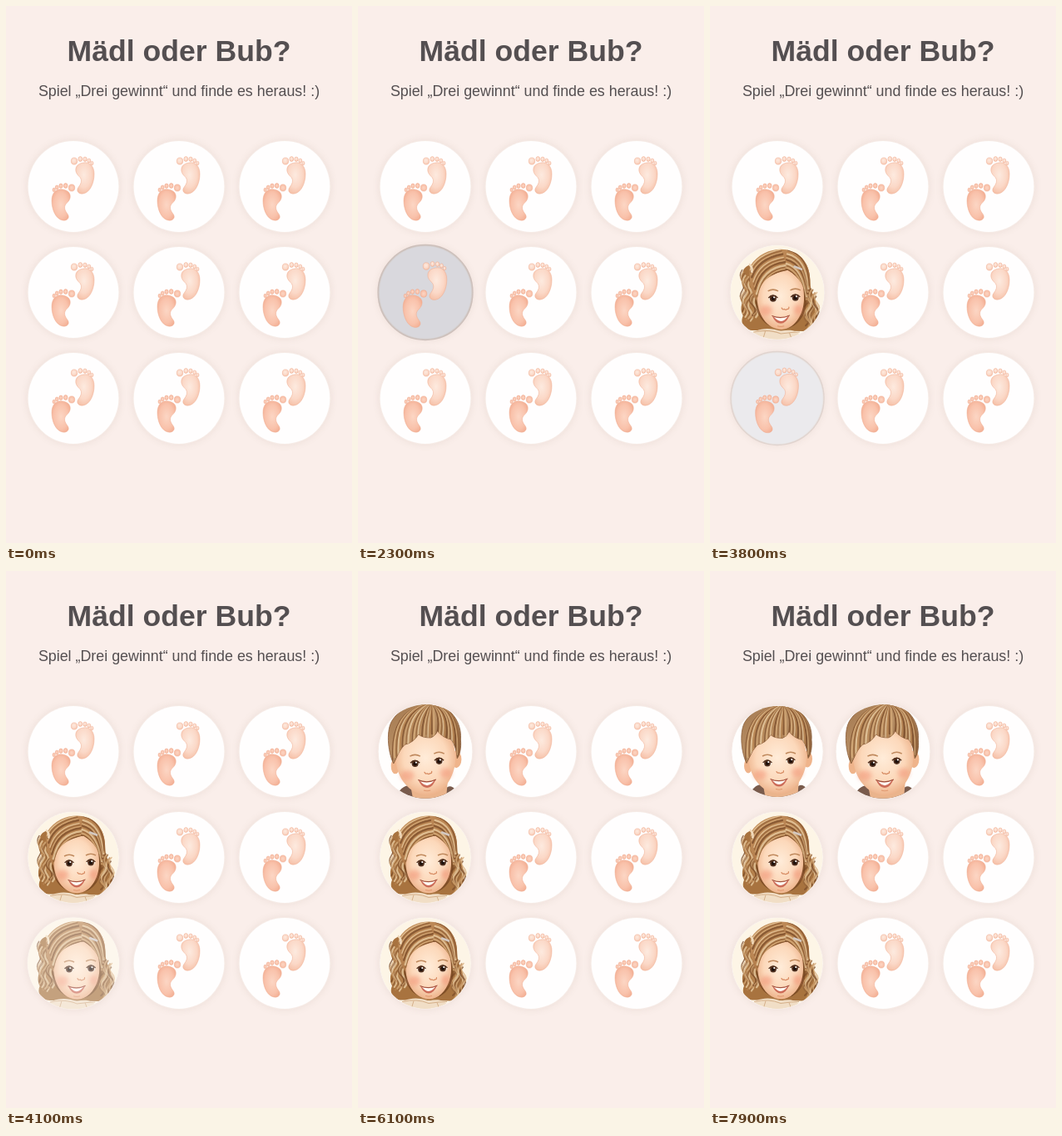
Animation, 416 px wide and 644 px high, one loop 8000 ms. Source, as an HTML page:

```html
<!DOCTYPE html>
<html lang="de">
<head>
<meta charset="utf-8">
<title>Mädl oder Bub?</title>
<style>
  html, body { margin: 0; width: 100%; height: 100%; overflow: hidden; background: #faeeea; }
  svg { display: block; width: 416px; height: 644px; }
  text { font-family: "Liberation Sans", Arial, sans-serif; text-anchor: middle; fill: #544f51; }
  .hair path { fill: none; stroke-linecap: round; }
</style>
</head>
<body>
<svg id="stage" viewBox="0 0 416 644">
  <defs>
    <filter id="soft" x="-50%" y="-50%" width="200%" height="200%"><feGaussianBlur stdDeviation="4"/></filter>
    <filter id="blush" x="-50%" y="-50%" width="200%" height="200%"><feGaussianBlur stdDeviation="2.5"/></filter>
    <radialGradient id="pale" cx=".45" cy=".4" r=".65">
      <stop offset="0" stop-color="#fdeadf"/><stop offset=".6" stop-color="#fbd8c7"/><stop offset="1" stop-color="#f5bda3"/>
    </radialGradient>
    <radialGradient id="warm" cx=".5" cy=".5" r=".65">
      <stop offset="0" stop-color="#fcd6c4"/><stop offset=".6" stop-color="#f9c2ab"/><stop offset="1" stop-color="#f0a689"/>
    </radialGradient>
    <radialGradient id="skin" cx=".5" cy=".45" r=".6">
      <stop offset="0" stop-color="#ffecd9"/><stop offset=".6" stop-color="#fcd8ba"/><stop offset="1" stop-color="#e9a97f"/>
    </radialGradient>
    <linearGradient id="gold" x1="0" y1="0" x2="1" y2="1">
      <stop offset="0" stop-color="#cf9f6b"/><stop offset=".5" stop-color="#b27c4b"/><stop offset="1" stop-color="#9a6539"/>
    </linearGradient>
    <linearGradient id="chestnut" x1="0" y1="0" x2="1" y2="1">
      <stop offset="0" stop-color="#a2774e"/><stop offset=".45" stop-color="#b88f65"/><stop offset="1" stop-color="#7d5535"/>
    </linearGradient>
    <path id="locks" d="M-32,-30C-20,-50 4,-53 16,-48C30,-44 38,-30 38,-14C38,-4 36,6 33,10C33,-6 26,-18 12,-26C2,-24 -10,-20 -16,-12C-21,-6 -22,2 -24,10C-30,2 -34,-14 -32,-30Z"/>
    <path id="mop" d="M-37,14C-44,0 -46,-26 -38,-37C-28,-52 -10,-57 4,-55C24,-57 43,-38 41,-14C42,-4 40,4 37,8Q36,-6 30,-14Q20,-16 14,-24Q12,-18 6,-16Q-4,-16 -8,-20Q-14,-10 -24,-8Q-30,-2 -34,8Z"/>
    <clipPath id="disc"><circle r="54.4"/></clipPath>
    <clipPath id="in-locks"><use href="#locks"/></clipPath>
    <clipPath id="in-mop"><use href="#mop"/></clipPath>

    <g id="foot" stroke="#efab8e" stroke-width=".5">
      <path d="M12,-28.5C19,-30 25,-25 25,-15C25,-4 20,7 12,8.5C6,9.5 3,5 6,1C9,-3 11,-7 8,-11C5,-14 2,-17 3,-22C4,-26 8,-28 12,-28.5Z"/>
      <ellipse cx="1" cy="-30.5" rx="3.7" ry="4.1"/>
      <ellipse cx="8.3" cy="-33" rx="2.4" ry="2.9"/>
      <ellipse cx="14" cy="-32.8" rx="2.2" ry="2.7"/>
      <ellipse cx="18.8" cy="-31" rx="2" ry="2.5"/>
      <ellipse cx="22.4" cy="-28" rx="1.6" ry="2.2"/>
    </g>
    <g id="feet">
      <use href="#foot" fill="url(#pale)"/>
      <use href="#foot" fill="url(#warm)" transform="translate(-1,32) scale(-1,1)"/>
    </g>

    <g id="eye">
      <ellipse rx="5" ry="4" fill="#fff6ee"/>
      <circle r="3.9" fill="#55321f"/>
      <circle cy=".3" r="2.2" fill="#1e100b"/>
      <circle cx="1.3" cy="-1.4" r="1.1" fill="#fff"/>
      <path d="M-5.4,-.6Q0,-6.6 5.4,-.6" fill="none" stroke="#4f2d1b" stroke-width="1.4"/>
      <path d="M-6,-8.5Q0,-12 6,-8.5" fill="none" stroke="#c08a5e" stroke-width="1.5"/>
    </g>
    <g id="smile">
      <path d="M-10,-2.5Q0,1.5 10,-3Q6,6 0,6Q-6,6 -10,-2.5Z" fill="#cc6c59"/>
      <path d="M-8,-1.6Q0,1.5 8,-2Q4,3.4 0,3.4Q-4,3.4 -8,-1.6Z" fill="#fffaf4"/>
      <path d="M-10.5,-3Q0,1.5 10.5,-3.5" fill="none" stroke="#9b4a38"/>
      <path d="M-4,9Q0,10.5 4,9" fill="none" stroke="#e0986f"/>
    </g>
    <path id="nose" d="M-4,0Q-3,2.4 -1,1.4Q1,3 3,1.2Q4.6,1.6 4.4,-1" fill="none" stroke="#d78b62" stroke-width="1.2" stroke-linecap="round"/>

    <g id="girl" clip-path="url(#disc)">
      <circle r="55" fill="#fdf5e6"/>
      <path fill="#a8733f" d="M-26,-34C-5,-54 22,-50 34,-32C40,-20 37,-10 40,0C48,10 43,20 47,28C46,38 38,44 30,45L-28,44C-38,44 -44,36 -40,27C-45,18 -40,8 -36,0C-42,-6 -44,-18 -39,-27C-35,-33 -29,-32 -26,-34Z"/>
      <g class="hair" id="curls"/>
      <path fill="#f1dec6" d="M-38,57C-28,40 -10,40 4,45C14,43 24,42 32,57Z"/>
      <path fill="none" stroke="#d5b08a" d="M-28,46Q-10,42 4,48Q18,46 26,46M-14,45L-17,55M14,47L17,55"/>
      <path fill="#73431f" d="M-26,6C-27,-18 -8,-28 10,-29C27,-27 35,-10 34,8C34,28 22,42 7,42C-14,42 -26,28 -26,6Z" opacity=".75"/>
      <path fill="url(#skin)" d="M-24,2C-24,-18 -8,-27 10,-27C24,-26 31,-12 31,4C32,22 22,42 5,43C-12,43 -24,26 -24,2Z"/>
      <g fill="#f3977a" opacity=".6" filter="url(#blush)"><ellipse cx="-13" cy="21" rx="7" ry="6"/><ellipse cx="24" cy="20" rx="5" ry="6"/></g>
      <use href="#eye" x="-5" y="7"/><use href="#eye" x="21" y="6"/>
      <use href="#nose" x="9" y="18"/><use href="#smile" x="4" y="30"/>
      <use href="#locks" fill="url(#gold)"/>
      <g class="hair" id="sweep" clip-path="url(#in-locks)"/>
      <path d="M-33,-33Q-28,-29 -30,-23" fill="none" stroke="#f0d9ba" stroke-width="2.5"/>
      <path d="M20,-30L28,-27" stroke="#d3c8c1" stroke-width="2.5" stroke-linecap="round"/>
    </g>

    <g id="boy" clip-path="url(#disc)">
      <circle r="55" fill="#fffefd"/>
      <path fill="#795b4c" d="M-36,57C-30,40 -20,36 -12,42L22,45C28,36 36,40 40,57Z"/>
      <path fill="#eab48c" d="M-18,36L26,34L24,57L-14,57Z"/>
      <ellipse cx="-35" cy="17" rx="5" ry="9" fill="#efb48b"/><ellipse cx="36" cy="9" rx="6" ry="10" fill="#efb48b"/>
      <path fill="url(#skin)" d="M-35,5C-36,-18 -18,-28 2,-28C24,-28 35,-14 35,6C36,26 22,51 3,51C-18,50 -34,32 -35,5Z"/>
      <g fill="#f3977a" opacity=".55" filter="url(#blush)"><ellipse cx="-21" cy="28" rx="8" ry="6"/><ellipse cx="24" cy="25" rx="7" ry="6"/></g>
      <use href="#eye" x="-12" y="14"/><use href="#eye" x="16" y="11"/>
      <use href="#nose" x="3" y="24"/><use href="#smile" x="2" y="36"/>
      <use href="#mop" fill="url(#chestnut)" stroke="#8a5c38" stroke-width=".8"/>
      <g class="hair" id="fringe" clip-path="url(#in-mop)"/>
    </g>
  </defs>

  <rect width="416" height="644" fill="#faeeea"/>
  <text x="208" y="66" font-size="35.6" font-weight="bold">Mädl oder Bub?</text>
  <text x="208" y="108" font-size="17.85">Spiel „Drei gewinnt“ und finde es heraus! :)</text>
</svg>
<script>
const $ = id => document.getElementById(id);
const clamp = v => Math.max(0, Math.min(1, v));
const ease = v => { v = clamp(v); return v * v * (3 - 2 * v); };

let seed = 7;
const rand = (a, b) => a + (b - a) * ((seed = seed * 16807 % 2147483647) / 2147483647);

function add(parent, name, attrs) {
  const el = document.createElementNS("http://www.w3.org/2000/svg", name);
  for (const key in attrs) el.setAttribute(key, attrs[key]);
  return parent.appendChild(el);
}

// Hair strands in mixed tones and widths; u runs from 0 to 1 across the lock
const tones = ["#7a4b28", "#d9ae7b", "#96653a", "#ecd0a6", "#bb8753"];
function strands(id, count, path) {
  for (let i = 0; i < count; i++)
    add($(id), "path", { d: path(i / (count - 1)), stroke: tones[i % 5], "stroke-width": rand(1, 2.6), opacity: .75 });
}
const wave = () => `q${rand(-8, -4)},6 0,12t0,12t0,12`;
strands("curls", 14, u => `M${-41 + u * 16},${rand(-26, -14)}${wave()}t0,12`);
strands("curls", 12, u => `M${33 + u * 13},${rand(-10, -2) + u * 8}${wave()}t0,12`);
strands("sweep", 14, u => `M${12 - u * 8},${-26 - u * 24}Q${-16 - u * 8},${-24 - u * 20} ${-22 - u * 10},${10 - u * 36}`);
strands("sweep", 11, u => `M${10 + u * 2},${-27 - u * 22}Q${26 + u * 10},${-22 - u * 22} ${33 + u * 4},${10 - u * 18}`);
strands("fringe", 22, u => `M${2 + u * 7},-55Q${-42 + u * 52},${-48 + u * 12} ${-38 + u * 48},${12 - 30 * Math.sin(u * 1.6) + rand(-3, 3)}`);
strands("fringe", 13, u => `M${9 + u * 4},-55Q${18 + u * 24},${-42 - u * 8} ${14 + u * 25},${-20 + u * u * 28}`);

const taps = [
  { cell: 3, at: 2100, face: "girl" },
  { cell: 6, at: 3700, face: "girl" },
  { cell: 0, at: 4800, face: "boy" },
  { cell: 1, at: 6800, face: "boy" }
];

const cells = Array.from({ length: 9 }, (_, i) => {
  const x = 81 + i % 3 * 127, y = 216.5 + Math.floor(i / 3) * 127;
  const g = add($("stage"), "g", {});
  add(g, "circle", { r: 56, fill: "#8a6a58", opacity: .11, filter: "url(#soft)" });
  add(g, "circle", { r: 55.5, fill: "#f6ebe6" });
  add(g, "circle", { r: 54.4, fill: "#fffefe" });
  const shade = add(g, "circle", { r: 54.6, fill: "#6e6e80", stroke: "#5c4a46", "stroke-width": 2.4 });
  const feet = add(g, "use", { href: "#feet" });
  const tap = taps.findIndex(t => t.cell === i);
  const face = tap < 0 ? null : add(g, "use", { href: "#" + taps[tap].face });
  return { x, y, g, feet, face, shade, tap };
});

function draw(t) {
  for (const c of cells) {
    const d = c.tap < 0 ? -1 : t - taps[c.tap].at;
    const next = taps[c.tap + 1];
    const open = d >= 350;
    let lift = open ? ease((d - 350) / 150) : ease(d / 200);
    if (c.tap >= 0 && next) lift *= 1 - ease((t - next.at - 300) / 100);
    c.g.setAttribute("transform", `translate(${c.x},${c.y}) scale(${1 + .033 * lift})`);
    c.feet.setAttribute("opacity", open ? 0 : 1);
    c.shade.setAttribute("opacity", open ? 0 : .26 * clamp(d / 200));
    if (c.face) c.face.setAttribute("opacity", open ? clamp((d - 200) / 300) : 0);
  }
}

function tick() {
  // The picture advances ten times a second
  draw(Math.floor(performance.now() % 8000 / 100) * 100);
  requestAnimationFrame(tick);
}
tick();
</script>
</body>
</html>
```
